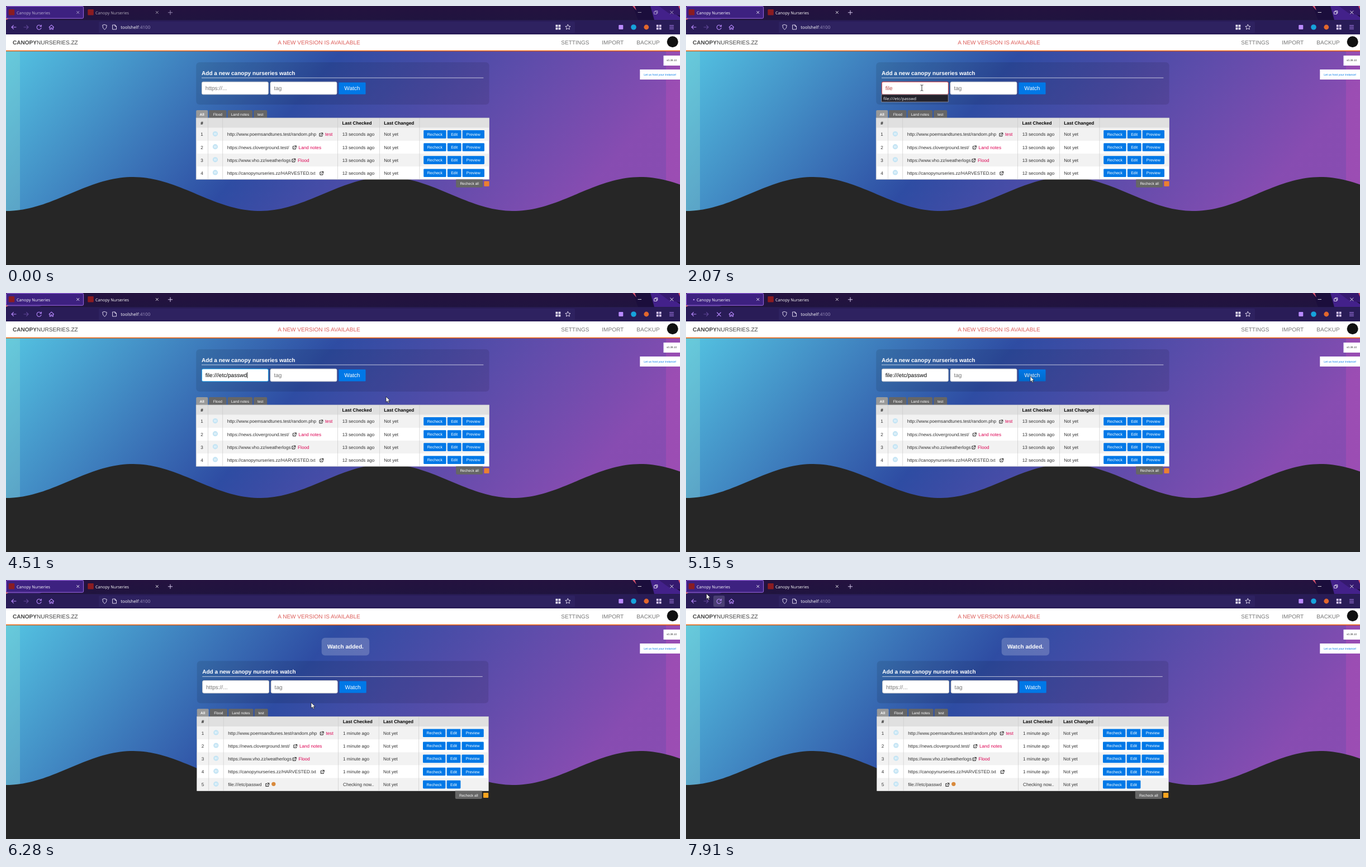
Recreate the animation shown at these times as an HTML page. Size 1206 by 465 pixels, loop 8000 ms.

```html
<!DOCTYPE html>
<html lang="en">
<head>
<meta charset="utf-8">
<title>Watch list</title>
<style>
  html, body { margin: 0; width: 100%; height: 100%; overflow: hidden; background: #262626; }
  svg { display: block; width: 100%; height: 100%; }
  text { font-family: "Liberation Sans", Arial, sans-serif; text-rendering: geometricPrecision; white-space: pre; }
  .ui { font-family: "Open Sans", "Noto Sans", sans-serif; }
  .bold { font-weight: bold; }
  .line { fill: none; stroke-linecap: round; stroke-linejoin: round; }
  #sky { position: absolute; left: 0; top: 51px; width: 1206px; height: 377px; }
</style>
</head>
<body>
<svg id="stage" viewBox="0 0 1206 465" preserveAspectRatio="none"></svg>
<script>
const LOOP = 8000;
const TITLE = 'Canopy Nurseries';
const ENTRY = 'file:///etc/passwd';
const BASE = 10.05, CELL = 8.17, SMALL = 7.03, TINY = 6.5;
const BLUE = '#0078e7', PURPLE = '#b98aff', PALE = '#ece6fa';

// Drawing helpers
const rect = (x, y, w, h, fill, r = 0, extra = '') =>
  `<rect x="${x}" y="${y}" width="${w}" height="${h}" rx="${r}" fill="${fill}" ${extra}/>`;
const disc = (x, y, r, fill) => `<circle cx="${x}" cy="${y}" r="${r}" fill="${fill}"/>`;
const line = (d, color, width = 1, extra = '') =>
  `<path class="line" d="${d}" stroke="${color}" stroke-width="${width}" ${extra}/>`;
const text = (x, y, label, size = CELL, fill = '#333', cls = '', anchor = 'start', extra = '') =>
  `<text x="${x}" y="${y}" font-size="${size}" fill="${fill}" class="${cls}" text-anchor="${anchor}" ${extra}>${label}</text>`;
const button = (x, y, w, h, label, size, fill = BLUE, cls = '') =>
  rect(x, y, w, h, fill, 1.3) + text(x + w / 2, y + h / 2 + size * 0.36, label, size, '#fff', cls, 'middle');
const field = (x, y, hint, id = '') =>
  rect(x, y, 119, 22.6, '#fff', 2.5, `stroke="#ccc" stroke-width=".9" ${id && `id="${id}Box"`}`) +
  text(x + 6.4, y + 15, hint, BASE, '#757575', '', 'start', id && `id="${id}Hint"`);
const linkIcon = (x, y) =>
  line(`M${x + 2.4} ${y - 4.6}h-1.8v5h5v-1.8M${x + 3.6} ${y - 5.4}h2.9v2.9M${x + 6.3} ${y - 5.2}l-3.5 3.5`, '#222', 1);
const pauseIcon = (x, y) =>
  disc(x, y, 4.6, '#c3e4f4') + line(`M${x - 1.3} ${y - 1.6}v3.2M${x + 1.3} ${y - 1.6}v3.2`, '#fff', 1);

function wave() {
  let d = 'M0 51H1206';
  for (let x = 1206; x >= 0; x -= 6) {
    d += `L${x} ${(337.5 + 30.5 * Math.cos(2 * Math.PI * x / 454)).toFixed(2)}`;
  }
  return d + 'Z';
}

function background() {
  // 130 degree gradient across a 1206 x 377 box
  const len = 1166, dx = 0.766 * len / 2, dy = 0.643 * len / 2;
  return `<defs>
    <linearGradient id="skyFill" gradientUnits="userSpaceOnUse" x1="${603 - dx}" y1="${239.5 - dy}" x2="${603 + dx}" y2="${239.5 + dy}">
      <stop stop-color="#5ad8f7"/><stop offset=".4107" stop-color="#2f50af"/><stop offset=".8405" stop-color="#9150bf"/>
    </linearGradient>
    <linearGradient id="hoverFill" x2="0" y2="1">
      <stop stop-opacity="0"/><stop offset=".4" stop-opacity=".05"/><stop offset="1" stop-opacity=".12"/>
    </linearGradient>
    <linearGradient id="tabBar" x2="0" y2="1"><stop stop-color="#24123f"/><stop offset="1" stop-color="#20143f"/></linearGradient>
    <clipPath id="skyClip"><path d="${wave()}"/></clipPath>
  </defs>` + rect(0, 0, 1206, 465, '#262626') +
  `<g clip-path="url(#skyClip)">${rect(0, 51, 1206, 377, 'url(#skyFill)', 0, 'opacity=".91"')}
   ${rect(0, 51, 25, 377, '#9fe0c8', 0, 'opacity=".26"')}${rect(1181, 51, 25, 377, '#d850b8', 0, 'opacity=".24"')}</g>`;
}

function browser() {
  const favicon = x => rect(x, 6, 10.5, 10.5, '#8a1c22', 1);
  const cross = (x, r, c, extra) => line(`M${x - r} ${11.5 - r}l${2 * r} ${2 * r}m0 ${-2 * r}l${-2 * r} ${2 * r}`, c, 0.9, extra);
  const blocks = (x, y, c) => rect(x, y, 3.8, 3.8, c) + rect(x + 5, y, 3.8, 3.8, c) +
    rect(x, y + 5, 3.8, 3.8, c) + rect(x + 5, y + 5, 3.8, 3.8, c);
  return rect(0, 0, 1206, 25.5, 'url(#tabBar)') +
    '<path d="M1122 0H1206V25H1131Z" fill="#1b0e3c"/><path d="M1153 0H1178L1206 20V25H1160Z" fill="#43218a"/>' +
    '<path d="M1168 0H1206V17L1186 13Z" fill="#35196f"/><path d="M1121 0h4l3 8Z M1203 0h3v7Z" fill="#d9556f"/>' +
    '<path d="M0 22H65L60 25H0Z" fill="#35206a"/><path d="M0 25V22H6Z" fill="#e2706a"/>' +
    rect(0.6, 0.6, 138, 21.6, '#3d2180', 2, 'stroke="#a06be6" stroke-width="1"') +
    `<g id="tabIcon">${favicon(4.7)}</g><circle id="dot" cy="12" r="1.3" fill="#b78af0"/>` + favicon(146.3) +
    `<g id="chrome">${text(19, 14.6, TITLE, 7.25, '#fff', 'ui')}${text(160, 14.6, TITLE, 7.25, '#fff', 'ui')}
      ${cross(128.7, 2, '#fff')}${cross(270.3, 2, '#fff')}${line('M290.3 11.8h7.4m-3.7-3.7v7.4', '#e9dcff', 0.9)}
      ${line('M1131 11.5h5.6', '#fff', 0.8)}${line('M1160 10.2h4.3v4.3h-4.3zM1161.5 10v-1.3h4.3v4.3h-1.3', '#fff', 0.8)}${cross(1191.3, 2.6, '#fff')}</g>` +
    rect(0, 25.3, 1206, 26, '#291c57') + rect(166, 28, 852, 20.3, '#2e2260', 2) +
    line('M18 38h-8m3.4-3.4l-3.4 3.4l3.4 3.4', PURPLE, 1.1) +
    line('M32 38h8m-3.4-3.4l3.4 3.4l-3.4 3.4', PURPLE, 1.1, 'opacity=".4"') +
    rect(49, 28, 20.3, 20.3, '#4a3f74', 2.5, 'id="reloadHover"') +
    line('M62.6 36.2A4 4 0 1 0 63 39.4M63.3 34v2.8h-2.8', PURPLE, 1.1, 'id="reload"') +
    line('M55.6 35l6.6 6.6m0-6.6l-6.6 6.6', PURPLE, 1.1, 'id="stop"') +
    line('M77 38.2l4.3-4l4.3 4M78.2 37.6v4.4h2v-2.6h2.2v2.6h2v-4.4', PURPLE, 1.1) +
    line('M176.5 33.5l3.8 1.3q0 5.5-3.8 7.7q-3.8-2.2-3.8-7.7z', PALE, 0.9) +
    line('M191 34h4l2.5 2.5v5.5h-6.5zM195 34v2.5h2.5', PALE, 0.9) +
    text(205.3, 41.2, 'toolshelf', 7.9, '#fff', 'ui') + text(238, 41.2, ':4100', 7.9, '#a79cc5', 'ui') +
    blocks(983.5, 33.7, PALE) +
    line('M1005.4 33.3l1.4 2.9l3.2.4l-2.4 2.2l.7 3.2l-2.9-1.6l-2.9 1.6l.7-3.2l-2.4-2.2l3.2-.4z', PALE, 0.9) +
    rect(1096.3, 34, 8, 8, PURPLE, 1) + disc(1123, 38, 4.8, '#17a3dc') + disc(1145.8, 38, 4.4, '#e2672c') +
    blocks(1163.8, 33.7, '#d8c8f5') + line('M1187.5 35h7m-7 3h7m-7 3h7', PURPLE, 1);
}

function header() {
  return rect(0, 51, 1206, 29, '#fff') + rect(0, 79.8, 1206, 1.5, '#ed5900') +
    text(12, 68.6, '<tspan class="bold">CANOPY</tspan>NURSERIES.ZZ', BASE, '#444') +
    text(560, 68.6, 'A NEW VERSION IS AVAILABLE', BASE, '#dd5f5b', '', 'middle') +
    text(993.3, 68.6, 'SETTINGS', BASE, '#777') + text(1066.3, 68.6, 'IMPORT', BASE, '#777') +
    text(1128.3, 68.6, 'BACKUP', BASE, '#777') + disc(1192.7, 64.3, 10, '#111') +
    rect(1176.5, 89, 30, 18, '#fff') + text(1191, 99.4, 'v0.39.10', 4.75, '#333', '', 'middle') +
    rect(1134.3, 114, 72, 18, '#fff') + text(1170.3, 124.6, 'Let us host your instance!', 5.1, BLUE, '', 'middle');
}

// [address, link icon x, tag]; x measured from the start of the address
const SITES = [
  ['http://www.poemsandtunes.test/random.php', 164.5, 'test'],
  ['https://news.cloverground.test/', 117, 'Land notes'],
  ['https://www.vho.zz/weatherlogs', 115.5, 'Flood'],
  ['https://canopynurseries.zz/HARVESTED.txt', 165.5, ''],
];
const TABS = [[0, 21, 'All'], [23, 31.3, 'Flood'], [56.5, 44.3, 'Land notes'], [103, 24, 'test']];

function page({ left, right, top, x, cols, sites, age, id, feed }) {
  const table = top + 100, headH = 17.8, rowH = 23.1, act = cols[4] + 7.6;
  const bottom = table + headH + rowH * sites.length;
  let s = rect(left, top, right - left, 76, '#000', 6, 'opacity=".1"') +
    text(x, top + 22.7, 'Add a new canopy nurseries watch', BASE, '#fff', 'bold') +
    rect(x, top + 27.6, right - left - 20, 0.8, '#fff', 0, 'opacity=".85"') +
    field(x + 0.4, top + 35.2, 'https://...', id) + field(x + 123, top + 35.2, 'tag') +
    button(x + 245.3, top + 36.2, 48.2, 21.3, 'Watch', BASE);
  TABS.forEach(([dx, w, label], i) => {
    s += rect(left + dx, top + 86, w, 16, i ? '#666' : '#999', 2) +
      text(left + dx + w / 2, top + 95.6, label, TINY, '#fff', i ? '' : 'bold', 'middle');
  });
  s += rect(left, table, right - left, bottom - table, '#fff') + rect(left, table, right - left, headH, '#e0e0e0') +
    text((left + cols[0]) / 2, table + 12, '#', CELL, '#000', 'bold', 'middle') +
    text(cols[2] + 8.5, table + 12, 'Last Checked', CELL, '#000', 'bold') +
    text(cols[3] + 8.3, table + 12, 'Last Changed', CELL, '#000', 'bold');
  sites.forEach(([address, iconX, tag], i) => {
    const y = table + headH + rowH * i, base = y + 14.6, own = i === 4;
    if (i % 2 === 0) s += rect(left, y, right - left, rowH, '#f2f2f2');
    s += text((left + cols[0]) / 2, base, i + 1, CELL, '#333', '', 'middle') +
      pauseIcon(cols[0] + 13.4, y + 10.8) + text(cols[1] + 8.4, base, address) +
      linkIcon(cols[1] + 8.4 + iconX, base) +
      text(cols[1] + 19.2 + iconX, base, tag, CELL, '#dd0052') +
      text(cols[2] + 8.7, base, own ? 'Checking now..' : age(i)) + text(cols[3] + 8.2, base, 'Not yet') +
      button(act, y + 4.3, 40.4, 14.6, 'Recheck', SMALL) + button(act + 42.6, y + 4.3, 24.8, 14.6, 'Edit', SMALL);
    s += own ? disc(cols[1] + 90, y + 10.8, 3.6, '#d98a3c') : button(act + 69.5, y + 4.3, 39.3, 14.6, 'Preview', SMALL);
  });
  for (const c of cols) s += rect(c, table, 0.7, bottom - table, '#cbcbcb');
  return s + rect(left, table, right - left, bottom - table, 'none', 0, 'stroke="#cbcbcb" stroke-width=".7"') +
    `<path d="M${right - 59.4} ${bottom}h48v12.5q0 2-2 2h-44q-2 0-2-2z" fill="#666"/>` +
    text(right - 35.4, bottom + 10, 'Recheck all', TINY, '#fff', '', 'middle') +
    rect(right - 9.2, bottom + 3.3, 9.2, 9.2, feed, 1);
}

const before = page({
  left: 340.2, right: 864.6, top: 101, x: 350, cols: [361, 387.4, 593, 668, 739.6], sites: SITES,
  age: i => (i === 3 ? 12 : 13) + ' seconds ago', id: 'entry', feed: '#ec8030',
}) + text(356.8, 151.2, '', BASE, '#000', '', 'start', 'id="typed"') +
  rect(0, 142.3, 0.8, 10.5, '#000', 0, 'id="caret"') +
  rect(595.3, 137.2, 48.2, 21.3, 'url(#hoverFill)', 1.3, 'id="watchHover"') +
  `<g id="hints">${rect(349.8, 159, 119.4, 13.2, '#23222b', 0, 'stroke="#9a98a5" stroke-width=".8"')}
   ${text(353, 168.5, ENTRY, 7.35, '#fbfbfe', 'ui')}</g>`;

const after = rect(564.7, 103.8, 85.5, 31.6, '#fff', 6, 'opacity=".2"') +
  text(607.4, 123, 'Watch added.', BASE, '#fff', 'bold', 'middle') +
  page({
    left: 341.7, right: 863.2, top: 145.3, x: 351.2, cols: [362.4, 388.8, 594.3, 666.8, 738.4],
    sites: [...SITES, [ENTRY, 67, '']], age: () => '1 minute ago', id: '', feed: '#f9a41f',
  }) + rect(746, 359.8, 40.4, 14.6, 'url(#hoverFill)', 1.3, 'id="recheckHover"');

const outline = 'fill="#fff" stroke="#111" stroke-width=".7" stroke-linejoin="round"';
const cursors = `<g id="cursor">
  <path id="arrow" d="M0 0V10L2.3 7.9L3.9 11.4L5.5 10.7L4 7.3H7.1Z" ${outline}/>
  <path id="hand" d="M-1 1Q0-.7 1 1V5L5 6Q6.2 6.4 6 8L5 12.3H-.6L-3.6 8.2Q-3.8 6.6-2.3 7L-1 8Z" ${outline}/>
  <path id="beam" class="line" d="M-2-5.2Q0-5.2 0-4.4Q0-5.2 2-5.2M0-4.4V4.4M-2 5.2Q0 5.2 0 4.4Q0 5.2 2 5.2" stroke="#222" stroke-width=".9"/></g>`;

document.getElementById('stage').innerHTML = background() + browser() + header() +
  `<g id="before">${before}</g><g id="after">${after}</g>` + cursors;

// Timeline
const KEY_TIMES = [1540, 1820, 1900, 1990, 2160, 2450, 2530, 2610, 2790, 2900, 3170, 3250, 3330, 3530, 3530, 3710, 3980, 4070];
const FOCUS = 900, CLICK = 4790, LOADED = 5260, ICON_BACK = 5510, READY = 5880;
const POINTER = [
  [160, 1061, 411, 'arrow'], [260, 760, 290, 'arrow'], [350, 509, 189, 'arrow'],
  [530, 462, 165, 'arrow'], [620, 436, 152, 'beam'], [710, 425, 148, 'beam'], [800, 422, 147, 'beam'],
  [4160, 436, 150, 'beam'], [4250, 520, 166, 'arrow'], [4340, 630, 182, 'arrow'], [4430, 680, 186, 'arrow'],
  [4520, 660, 172, 'arrow'], [4610, 628, 156, 'arrow'], [4690, 616, 149.5, 'arrow'],
  [6090, 608, 156, 'arrow'], [6180, 580, 180, 'arrow'], [6270, 546, 220, 'arrow'], [6360, 532, 262, 'arrow'],
  [6450, 548, 300, 'arrow'], [6550, 600, 332, 'arrow'], [6640, 662, 352, 'arrow'], [6730, 714, 362, 'arrow'],
  [6820, 740, 366, 'arrow'], [6910, 752, 365, 'hand'], [7000, 760, 364, 'hand'], [7280, 760.5, 363.5, 'hand'],
  [7370, 706, 318, 'arrow'], [7460, 560, 222, 'arrow'], [7550, 390, 138, 'arrow'], [7640, 235, 82, 'arrow'],
  [7730, 122, 52, 'arrow'], [7820, 60, 37, 'arrow'], [7910, 36.5, 24.5, 'arrow'],
];

const el = id => document.getElementById(id);
const show = (id, on) => el(id).setAttribute('visibility', on ? 'inherit' : 'hidden');
const set = (id, attrs) => { for (const k in attrs) el(id).setAttribute(k, attrs[k]); };
const within = (t, a, b) => t >= a && t < b;

function draw(t) {
  const count = KEY_TIMES.filter(k => k <= t).length;
  const focused = within(t, FOCUS, CLICK), invalid = count > 0 && count < 5;
  el('typed').textContent = ENTRY.slice(0, count);
  set('typed', { fill: invalid ? '#b94a48' : '#000' });
  set('entryBox', { stroke: !focused ? '#ccc' : invalid && t >= 1820 ? '#e9322d' : '#129fea' });
  set('caret', { x: 357.2 + el('typed').getComputedTextLength() });

  const loaded = t >= LOADED;
  show('before', !loaded);
  show('after', loaded);
  show('entryHint', !loaded && !count);
  show('caret', within(t, 2160, CLICK));
  show('hints', within(t, KEY_TIMES[0], 4070));
  show('watchHover', within(t, 4610, LOADED));
  show('recheckHover', within(t, 6910, 7370));

  const loading = within(t, CLICK + 90, ICON_BACK);
  show('tabIcon', !loading);
  show('dot', within(t, CLICK + 90, LOADED));
  set('dot', { cx: 10 + 4 * Math.cos((t - 5150) / 150) });
  show('stop', loading);
  set('stop', { opacity: loaded ? 0.4 : 1 });
  show('reload', !loading);
  set('reload', { opacity: within(t, ICON_BACK, READY) ? 0.45 : 1 });
  show('reloadHover', t >= 7820);
  set('chrome', { opacity: t < FOCUS ? 0.65 : 1 });

  const spot = POINTER.findLast(p => p[0] <= t);
  show('cursor', spot);
  for (const kind of ['arrow', 'hand', 'beam']) show(kind, spot && spot[3] === kind);
  if (spot) set('cursor', { transform: `translate(${spot[1]} ${spot[2]})` });
}

function tick() {
  draw(performance.now() % LOOP);
  requestAnimationFrame(tick);
}
tick();
</script>
</body>
</html>
```
